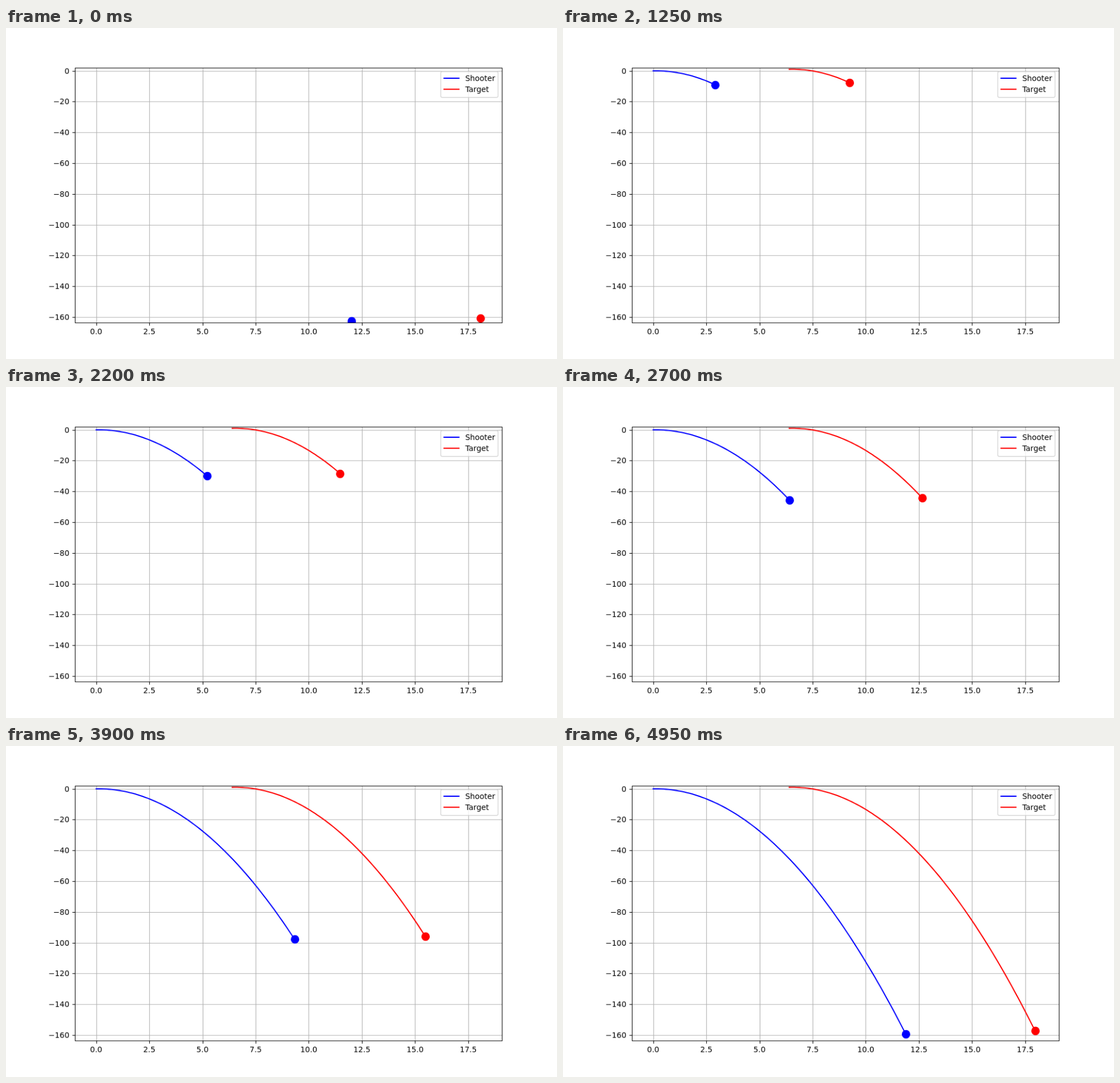
Write an HTML page with a canvas that moves like this. It is 966x580 px and loops after 5000 ms.

```html
<!DOCTYPE html>
<html lang="en">
<head>
<meta charset="utf-8">
<title>Falling trajectories</title>
<style>
  html, body { margin: 0; width: 100%; height: 100%; overflow: hidden; background: #fff; }
  canvas { display: block; width: 966px; height: 580px; }
</style>
</head>
<body>
<!-- The plot is laid out on a 1000 x 600 figure and shown slightly reduced. -->
<canvas id="stage" width="1000" height="600"></canvas>
<script>
const ctx = document.getElementById('stage').getContext('2d');
const LEFT = 125, RIGHT = 900, TOP = 72, BOTTOM = 534;
const X_MIN = -1, X_MAX = 19.085, Y_MIN = -163.6, Y_MAX = 2.03;
const STEPS = 100, STEP_MS = 50;
const FALL = 166; // distance lost to gravity over the whole flight
const THIN = 1.11, THICK = 2.08;

const bodies = [
  { name: 'Shooter', color: '#00f', x: 0, y: 0, dx: 12, dy: 3.4 },
  { name: 'Target', color: '#f00', x: 6.4, y: 1, dx: 11.685, dy: 4.4 }
];

const toX = x => LEFT + (x - X_MIN) / (X_MAX - X_MIN) * (RIGHT - LEFT);
const toY = y => TOP + (Y_MAX - y) / (Y_MAX - Y_MIN) * (BOTTOM - TOP);
const snap = v => Math.round(v) + 0.5;

function position(body, index) {
  const s = index / (STEPS - 1);
  return [toX(body.x + body.dx * s), toY(body.y + body.dy * s - FALL * s * s)];
}

function line(points, color, width, cap = 'butt') {
  ctx.beginPath();
  points.forEach(([x, y]) => ctx.lineTo(x, y));
  ctx.strokeStyle = color;
  ctx.lineWidth = width;
  ctx.lineCap = cap;
  ctx.lineJoin = 'round';
  ctx.stroke();
}

function text(label, x, y, align) {
  ctx.fillStyle = '#000';
  ctx.textAlign = align;
  ctx.fillText(label, x, y);
}

function eachTick(onX, onY) {
  for (let v = 0; v <= 17.5; v += 2.5) onX(v, snap(toX(v)));
  for (let v = 0; v <= 160; v += 20) onY(v, snap(toY(-v)));
}

function drawGrid() {
  eachTick(
    (v, x) => line([[x, TOP], [x, BOTTOM]], '#b0b0b0', THIN),
    (v, y) => line([[LEFT, y], [RIGHT, y]], '#b0b0b0', THIN)
  );
}

function drawAxes() {
  const left = snap(LEFT), bottom = snap(BOTTOM);
  eachTick(
    (v, x) => {
      line([[x, bottom], [x, bottom + 5]], '#000', THIN);
      text(v.toFixed(1), toX(v), 555, 'center');
    },
    (v, y) => {
      line([[left - 5, y], [left, y]], '#000', THIN);
      text(v ? '\u2212' + v : '0', 115, Math.round(toY(-v) + 5), 'right');
    }
  );
  ctx.strokeRect(left, snap(TOP), RIGHT - LEFT, BOTTOM - TOP);
}

function drawBody(body, step) {
  const trail = Array.from({ length: step }, (_, i) => position(body, i));
  if (step > 1) line(trail, body.color, THICK, 'square');
  const [x, y] = position(body, (step + STEPS - 1) % STEPS);
  ctx.beginPath();
  ctx.arc(snap(x), snap(y), 7.64, 0, 2 * Math.PI);
  ctx.fillStyle = body.color;
  ctx.fill();
}

function drawLegend() {
  ctx.beginPath();
  ctx.roundRect(789, 79, 104, 46.7, 2.8);
  ctx.fillStyle = 'rgba(255,255,255,0.8)';
  ctx.fill();
  ctx.strokeStyle = 'rgba(204,204,204,0.8)';
  ctx.lineWidth = 1.39;
  ctx.stroke();
  bodies.forEach(({ name, color }, i) => {
    const y = 91 + 20 * i;
    line([[795, y], [822, y]], color, THICK, 'square');
    text(name, 833.5, y + 5, 'left');
  });
}

function draw(step) {
  ctx.fillStyle = '#fff';
  ctx.fillRect(0, 0, 1000, 600);
  ctx.font = '13.889px "DejaVu Sans", sans-serif';
  drawGrid();
  ctx.save();
  ctx.beginPath();
  ctx.rect(LEFT, TOP, RIGHT - LEFT, BOTTOM - TOP);
  ctx.clip();
  bodies.forEach(body => drawBody(body, step));
  ctx.restore();
  drawAxes();
  drawLegend();
}

const start = performance.now();
function tick() {
  const elapsed = Math.max(0, performance.now() - start);
  draw(Math.floor(elapsed / STEP_MS) % STEPS);
  requestAnimationFrame(tick);
}
tick();
</script>
</body>
</html>
```
